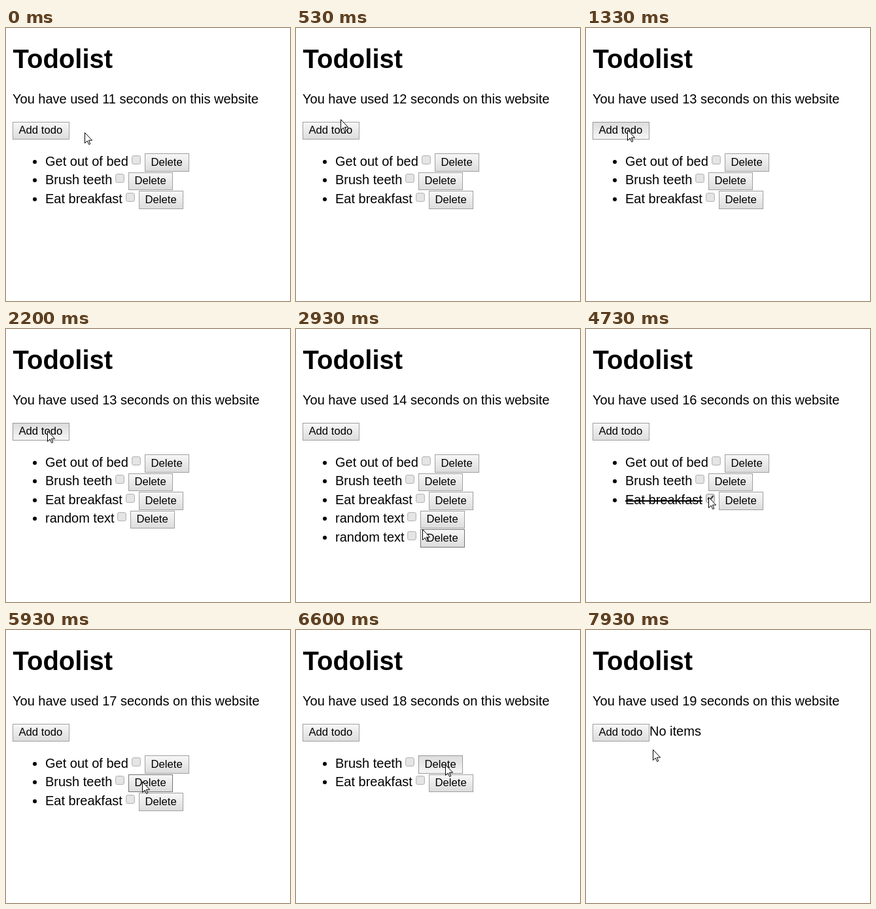
An HTML page that plays this animation: 434x416 px, repeating every 8000 ms.

```html
<!DOCTYPE html>
<html lang="en">
<head>
<meta charset="utf-8">
<title>Todolist</title>
<style>
html, body { margin: 0; width: 100%; height: 100%; overflow: hidden; background: #fff; }
svg { display: block; width: 434px; height: 416px; font: 20px "Liberation Sans", Arial, sans-serif; }
.btn text { font-size: 16.667px; }
.btn rect { fill: url(#up); stroke: #a0a0a0; }
.btn.hover rect { stroke: #747474; }
.btn.press rect { fill: url(#down); stroke: #999; }
.box rect { fill: #e5e5e5; stroke: #adadad; }
.box.hover rect { stroke: #8a8a8a; }
.box path { fill: none; stroke: #444; stroke-width: 2.4; }
</style>
</head>
<body>
<svg viewBox="0 0 434 416">
  <defs>
    <linearGradient id="up" x2="0" y2="1"><stop offset=".05" stop-color="#f6f6f6"/><stop offset="1" stop-color="#dcdcdc"/></linearGradient>
    <linearGradient id="down" x2="0" y2="1"><stop offset="0" stop-color="#dcdcdc"/><stop offset="1" stop-color="#f6f6f6"/></linearGradient>
  </defs>
  <rect width="434" height="416" fill="#fff"/>
  <text x="10.5" y="61" font-size="40" font-weight="bold">Todolist</text>
  <text id="used" x="10" y="115"></text>
  <g id="add"></g>
  <g id="list"></g>
  <text id="empty" x="97" y="161">No items</text>
  <text id="ruler" visibility="hidden"></text>
  <path id="cursor" d="M.5 .5V16.5L4.2 13L6.7 18.5L8.8 17.6L6.4 12.2H11.6Z" fill="#fff" stroke="#000"/>
</svg>
<script>
const $ = id => document.getElementById(id);
const TICKS = 120, RATE = 0.015, LEFT = 60, PITCH = 28.5;
const START = ['Get out of bed', 'Brush teeth', 'Eat breakfast'];

// Pointer moves: first tick, last tick, x, y
const MOVES = [
  [0, 8, 68, 139], [8, 11, 65, 149], [12, 16, 63, 155], [35, 38, 161, 331], [40, 47, 213, 288],
  [59, 67, 187, 253], [68, 70, 187, 256], [86, 92, 228, 205], [113, 114, 228, 215], [116, 119, 102, 182]
];

// Mouse button: tick down, tick up
const CLICKS = [
  [20, 21], [33, 35], [49, 51], [57, 58], [70, 71], [85, 86], [94, 95], [99, 101], [108, 109]
];

const widths = {};
function textWidth(s) {
  if (!widths[s]) {
    $('ruler').textContent = s;
    widths[s] = $('ruler').getComputedTextLength();
  }
  return widths[s];
}
const buttonX = label => Math.round(LEFT + textWidth(label) + 24.8);

function pointer(k) {
  let x = 120, y = 159;
  for (const [a, b, tx, ty] of MOVES) {
    const u = Math.min(1, Math.max(0, (k - a) / (b - a)));
    const e = u * u * (3 - 2 * u);
    x += (tx - x) * e;
    y += (ty - y) * e;
  }
  return [Math.round(x), Math.round(y)];
}

// Each click acts on whatever lies under the pointer
function click(list, [x, y]) {
  const i = Math.floor((y - 191) / PITCH);
  if (i < 0) list.push({ label: 'random text', done: false });
  else if (x < buttonX(list[i].label)) list[i].done = !list[i].done;
  else list.splice(i, 1);
}

function todosAt(k) {
  const list = START.map(label => ({ label, done: false }));
  for (const [, up] of CLICKS) if (k >= up) click(list, pointer(up));
  return list;
}

const inside = ([px, py], x, y, w, h) => px >= x && px < x + w && py >= y && py < y + h;

function button(label, x, top, base, mouse) {
  const w = Math.round(textWidth(label) / 1.2 + 20), h = base + 9 - top;
  const state = inside(mouse.tip, x, top, w, h) ? (mouse.down ? 'press' : 'hover') : '';
  return `<g class="btn ${state}"><rect x="${x + .5}" y="${top + .5}" width="${w - 1}" height="${h - 1}"/>
    <text x="${x + 9.5}" y="${base}">${label}</text></g>`;
}

function checkbox(x, y, done, mouse) {
  return `<g class="box ${inside(mouse.tip, x, y, 14, 14) ? 'hover' : ''}">
    <rect x="${x + .7}" y="${y + .7}" width="12.6" height="12.6" rx="2"/>
    ${done ? `<path d="M${x + 3} ${y + 7}l3 3l5.5 -7"/>` : ''}</g>`;
}

function row({ label, done }, i, mouse) {
  const top = Math.round(191.4 + PITCH * i), base = Math.floor(210 + PITCH * i);
  const x = buttonX(label);
  return `<circle cx="44" cy="${base - 6}" r="3"/>
    <text x="${LEFT}" y="${base}">${label}</text>
    ${done ? `<rect x="${LEFT}" y="${base - 6}" width="${textWidth(label)}" height="2"/>` : ''}
    ${checkbox(x - 20, base - 16, done, mouse)}
    ${button('Delete', x, top, base, mouse)}`;
}

function draw(k) {
  const list = todosAt(k);
  const mouse = { tip: pointer(k), down: CLICKS.some(([a, b]) => k >= a && k < b) };
  const secs = 11 + Math.floor((k + 10) / 15);
  $('used').textContent = `You have used ${secs} seconds on this website`;
  $('add').innerHTML = button('Add todo', 10, 143, 161, mouse);
  $('list').innerHTML = list.map((todo, i) => row(todo, i, mouse)).join('');
  $('empty').style.display = list.length ? 'none' : '';
  $('cursor').setAttribute('transform', `translate(${mouse.tip})`);
}

let shown = -1;
const start = performance.now();
function frame(now) {
  const k = Math.floor((Math.max(0, now - start) + 4) * RATE) % TICKS;
  if (k !== shown) draw(shown = k);
  requestAnimationFrame(frame);
}
frame(start);
</script>
</body>
</html>
```
